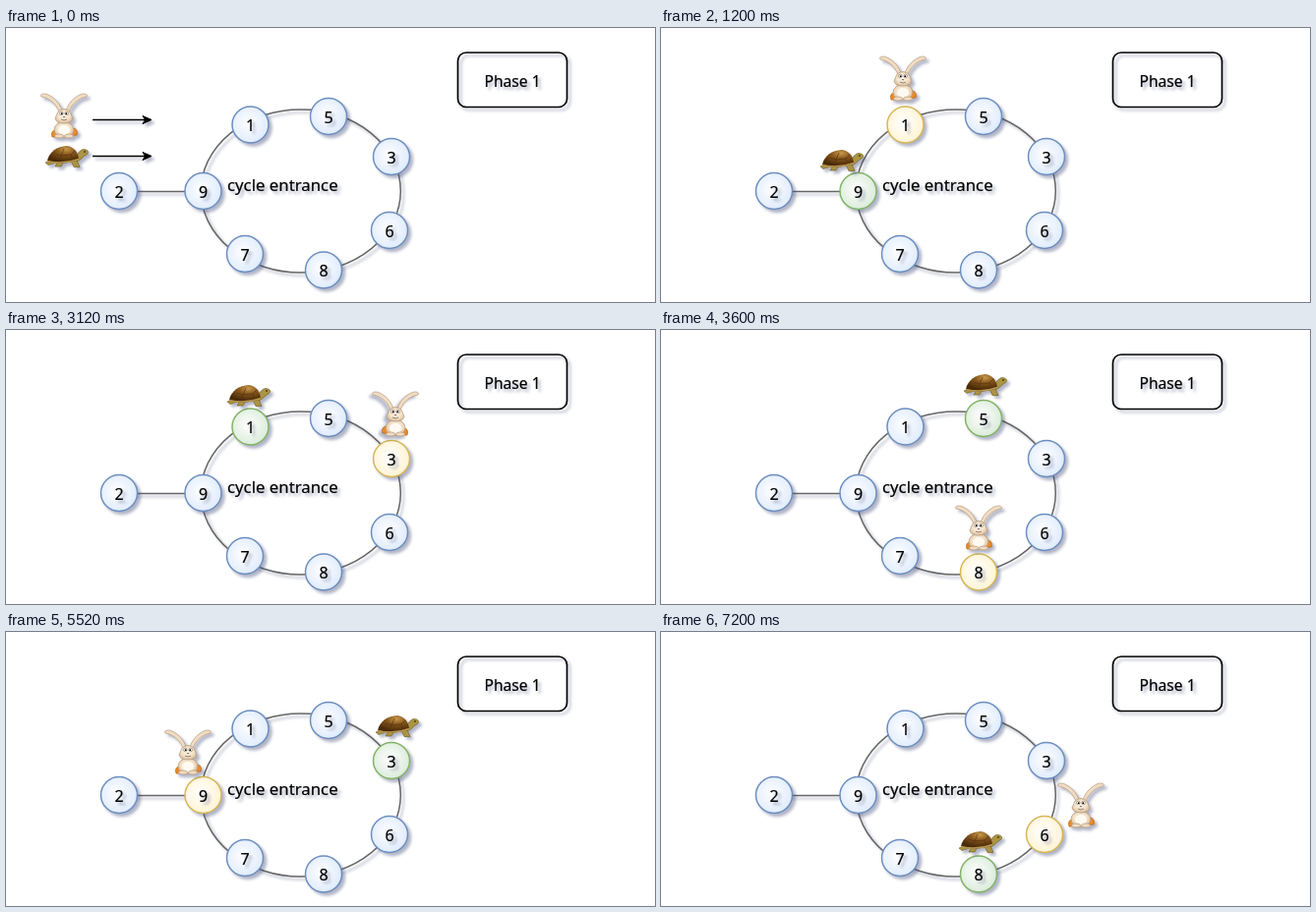
An HTML page that plays this animation: 660 px wide and 279 px high, repeating every 8000 ms.

```html
<!DOCTYPE html>
<html lang="en">
<head>
<meta charset="utf-8">
<title>Cycle detection</title>
<style>
  html, body { margin: 0; width: 100%; height: 100%; overflow: hidden; background: #fff; }
  svg { display: block; }
  text { font: 16px "Noto Sans", "Open Sans", sans-serif; fill: #000; stroke: #000; stroke-width: .2; }
  .shadow, text { filter: drop-shadow(3px 3px 1.7px rgba(61, 69, 116, .4)); }
  .line { fill: none; stroke: #666; stroke-width: 1.5; }
  #nodes text { text-anchor: middle; }
</style>
</head>
<body>
<svg width="660" height="279" viewBox="0 0 660 279">
  <defs>
    <radialGradient id="shell" cx=".6" cy=".2" r=".7">
      <stop offset="0" stop-color="#c99a4c"/>
      <stop offset=".45" stop-color="#85551c"/>
      <stop offset="1" stop-color="#4a2b08"/>
    </radialGradient>
    <radialGradient id="fur" cx=".48" cy=".45" r=".6">
      <stop offset="0" stop-color="#fffaf0"/>
      <stop offset=".6" stop-color="#f0dfc6"/>
      <stop offset="1" stop-color="#cfb08c"/>
    </radialGradient>
  </defs>

  <g class="shadow">
    <path class="line" d="M115 166.5H200"/>
    <ellipse class="line" cx="299.8" cy="166" rx="101.5" ry="83"/>
    <rect x="459.5" y="25" width="111" height="55.5" rx="8.5" fill="none" stroke="#000" stroke-width="1.7"/>
  </g>
  <text x="225" y="166" style="font-size:16.8px">cycle entrance</text>
  <text x="486.5" y="59.5" style="font-size:15.6px">Phase 1</text>
  <g id="nodes"></g>

  <g id="arrows" class="shadow" stroke="#000" stroke-width="1.6">
    <path d="M88 93.5H142M88 130.5H142"/>
    <path d="M148 93.5l-9-4 2.5 4-2.5 4zM148 130.5l-9-4 2.5 4-2.5 4z" stroke-width="1"/>
  </g>

  <g id="turtle" class="shadow">
    <g stroke="#6b5820" stroke-width=".6" fill="#ab9443">
      <path d="M-14 3l-8 3 3 2.5 9-3zM-9 5l-3 5h6l3-5zM4 4l3 6.5h6l-3-7z"/>
      <path d="M9 0C12-4 13-7 17-7.5c4 0 6 3 3.5 5C17-1 15 3 10 5z"/>
    </g>
    <path d="M-20 4C-18-5-10-10.5 0-11 7-10 11-5 12 2 7 7-13 8-20 4z" fill="url(#shell)"/>
    <path d="M-12-3l6 2 3-7M-6-1l-2 5M-6-1L4-2l4-4M4-2l2 5" fill="none" stroke="#56330d" stroke-width=".7"/>
    <path d="M-20 4.500Q-4 8.500 12 2.500" fill="none" stroke="#b89650" stroke-width="1.500"/>
    <circle cx="18" cy="-5" r=".8"/>
  </g>

  <g id="rabbit" class="shadow">
    <g stroke="#b79a7b" stroke-width=".7">
      <g fill="#efdcc3">
        <path d="M-5-5C-9-14-16-19-23-20c-2-3 3-4 7-2C-8-18-4-12-2-6z"/>
        <path d="M5-5C9-14 16-19 23-20c2-3-3-4-7-2C8-18 4-12 2-6z"/>
      </g>
      <path d="M-12 21q-2-7 4-7l5 7zM3 20l6-8q6 1 4 7z" fill="#ec8a2a" stroke="#b6630d"/>
      <g fill="url(#fur)">
        <ellipse cy="13.500" rx="10" ry="8"/>
        <path d="M-6-5Q0-10 6-5L9 2Q8 7 0 7T-9 2z"/>
      </g>
      <ellipse cy="14" rx="6" ry="5" fill="#fffaf1" stroke="none"/>
      <g fill="#efdcc3">
        <ellipse cx="-5" cy="20" rx="4.500" ry="2"/>
        <ellipse cx="5" cy="20" rx="4.500" ry="2"/>
      </g>
    </g>
    <g fill="#fff" stroke="#6e5a45" stroke-width=".5">
      <circle cx="-2.700" cy="-3" r="1.800"/>
      <circle cx="2.700" cy="-3" r="1.800"/>
    </g>
    <circle cx="-2.300" cy="-2.800" r=".9"/>
    <circle cx="2.300" cy="-2.800" r=".9"/>
    <path d="M-1.500 0h3L0 1.500z" fill="#8f5a50"/>
    <path d="M-3 3Q0 5 3 3" fill="none" stroke="#755744" stroke-width=".7"/>
  </g>
</svg>

<script>
const LOOP = 8000, STEP = 1200;
const SVG = "http://www.w3.org/2000/svg";
const $ = id => document.getElementById(id);

const nodes = {
  2: [115, 166], 9: [200.5, 166], 1: [248.5, 98.5], 5: [328, 90],
  3: [392, 131], 6: [390, 206], 7: [243, 230], 8: [323, 246.5]
};
const palette = {
  idle: ["#dae8fc", "#6c8ebf"],
  slow: ["#d5e8d4", "#82b366"],
  fast: ["#fff2cc", "#d6b656"]
};

// Each stop: visited node, x, y, facing
const turtleStops = [
  [2, 62, 131], [9, 184, 135], [1, 247, 67], [5, 330, 56],
  [3, 398, 96], [6, 427, 175], [8, 325, 214]
];
const rabbitStops = [
  [2, 59, 90], [1, 246, 52], [3, 396, 86, -1], [8, 323, 202],
  [9, 185, 123], [5, 327, 45, -1], [6, 427, 177]
];

function add(parent, name, attributes) {
  const element = parent.appendChild(document.createElementNS(SVG, name));
  for (const key in attributes) element.setAttribute(key, attributes[key]);
  return element;
}

for (const kind in palette) {
  const gradient = add(document.querySelector("defs"), "radialGradient", { id: kind, cx: .45, cy: .45, r: .65 });
  add(gradient, "stop", { offset: 0, "stop-color": "#fff" });
  add(gradient, "stop", { offset: 1, "stop-color": palette[kind][0] });
}

const circles = {};
for (const label in nodes) {
  const [cx, cy] = nodes[label];
  circles[label] = add($("nodes"), "circle", { cx, cy, r: 18.5, class: "shadow", "stroke-width": 1.5 });
  add($("nodes"), "text", { x: cx, y: cy + 6.5 }).textContent = label;
}

function place(id, [, x, y, facing = 1]) {
  $(id).setAttribute("transform", `translate(${x} ${y}) scale(${facing} 1)`);
}

let shown = -1;
function draw() {
  requestAnimationFrame(draw);
  const step = Math.floor(performance.now() % LOOP / STEP);
  if (step === shown) return;
  shown = step;

  const slow = turtleStops[step], fast = rabbitStops[step];
  place("turtle", slow);
  place("rabbit", fast);
  $("arrows").style.display = step ? "none" : "";
  for (const label in circles) {
    const kind = !step ? "idle" : +label === slow[0] ? "slow" : +label === fast[0] ? "fast" : "idle";
    circles[label].setAttribute("fill", `url(#${kind})`);
    circles[label].setAttribute("stroke", palette[kind][1]);
  }
}
draw();
</script>
</body>
</html>
```
